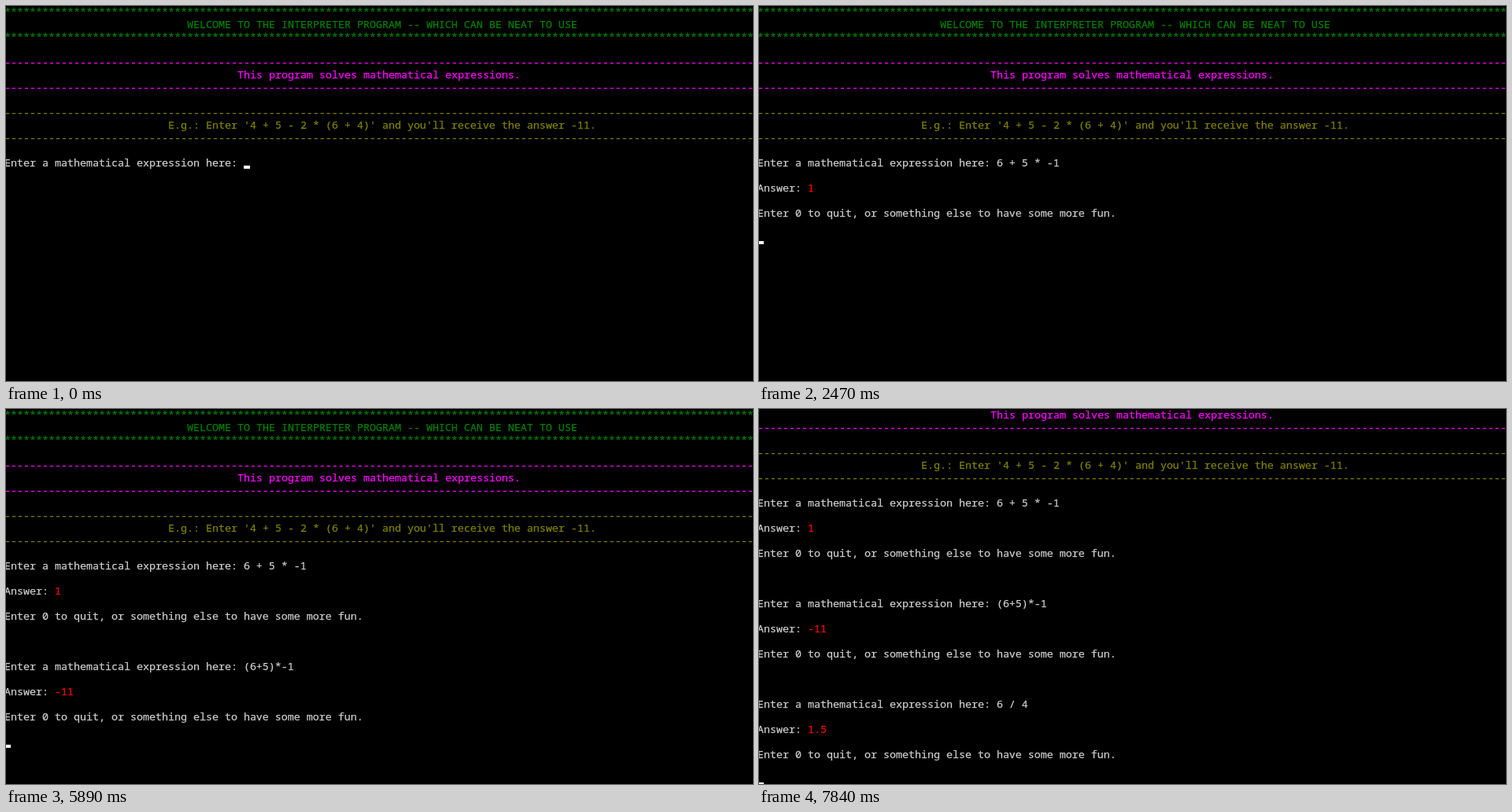
Animation of 949x477 px, one loop 8000 ms. Source, as an HTML page:

```html
<!DOCTYPE html>
<html lang="en">
<head>
<meta charset="utf-8">
<title>Interpreter program</title>
<style>
  html, body { margin: 0; width: 100%; height: 100%; overflow: hidden; background: #000; }
  svg { display: block; width: 949px; height: 477px; overflow: hidden; }
  text {
    font: 13.3333px "Noto Sans Mono", "DejaVu Sans Mono", monospace;
    white-space: pre;
    color: #ccc;
    fill: currentColor;
    stroke: currentColor;
    stroke-width: .25px;
  }
  .green { color: #008000; }
  .magenta { color: #f0f; }
  .olive { color: #808000; }
  .red { color: #f00; }
</style>
</head>
<body>
<svg viewBox="0 0 949 477">
  <g id="screen"><rect id="cursor" width="8" height="4" fill="#fff"/></g>
</svg>
<script>
const LOOP = 8000, CELL = 8, LINE = 16, LEFT = -2, COLS = 120, PACE = 80;
const PROMPT = 'Enter a mathematical expression here: ';
const screen = document.getElementById('screen');
const cursor = document.getElementById('cursor');

// typed: bursts of keys by start time, one key every PACE ms
const rounds = [
  { start: 0, done: 2470, answer: '1',
    typed: { 870: '6 +', 1360: ' ', 1590: '5 ', 1910: '* -1' } },
  { start: 2930, done: 5890, answer: '-11',
    typed: { 2930: '(', 3400: '6+', 3710: '5', 4710: ')', 5090: '*', 5410: '-1' } },
  { start: 6200, done: 7840, answer: '1.5',
    typed: { 6360: '6', 6530: ' /', 6910: ' ', 7060: '4' } }
];
// Spans in which the cursor is blinked off
const blinks = [[230, 790], [1740, 1910], [2700, 2930], [3940, 5180], [7230, 7750]];

function put(row, col, str, cls = '') {
  const el = document.createElementNS('http://www.w3.org/2000/svg', 'text');
  el.setAttribute('x', LEFT + col * CELL);
  el.setAttribute('y', row * LINE + 12);
  el.setAttribute('class', cls);
  el.textContent = str;
  screen.insertBefore(el, cursor);
  return el;
}

function banner(row, str, mark, cls) {
  const col = Math.floor((COLS - str.length) / 2);
  put(row, 0, mark.repeat(COLS), cls);
  put(row + 1, col, str, cls);
  put(row + 2, 0, mark.repeat(COLS), cls);
}

banner(0, 'WELCOME TO THE INTERPRETER PROGRAM -- WHICH CAN BE NEAT TO USE', '*', 'green');
banner(4, 'This program solves mathematical expressions.', '-', 'magenta');
banner(8, "E.g.: Enter '4 + 5 - 2 * (6 + 4)' and you'll receive the answer -11.", '-', 'olive');

rounds.forEach((r, i) => {
  r.row = 12 + 8 * i;
  r.input = put(r.row, 0, '');
  r.output = [
    put(r.row + 2, 0, 'Answer: '),
    put(r.row + 2, 8, r.answer, 'red'),
    put(r.row + 4, 0, 'Enter 0 to quit, or something else to have some more fun.')
  ];
});

const show = (el, on) => el.setAttribute('visibility', on ? 'visible' : 'hidden');

function typedBy(typed, t) {
  return Object.entries(typed)
    .map(([from, keys]) => keys.slice(0, Math.max(0, Math.floor((t - from) / PACE) + 1)))
    .join('');
}

function render(t) {
  let row = 0, col = 0;
  for (const r of rounds) {
    const started = t >= r.start, done = t >= r.done;
    show(r.input, started);
    r.output.forEach(el => show(el, done));
    if (!started) continue;
    const line = PROMPT + typedBy(r.typed, t);
    if (r.input.textContent !== line) r.input.textContent = line;
    row = done ? r.row + 6 : r.row;
    col = done ? 0 : line.length;
  }
  show(cursor, !blinks.some(([from, to]) => t >= from && t < to));
  cursor.setAttribute('x', LEFT + col * CELL);
  cursor.setAttribute('y', row * LINE + 11);
  const scroll = t >= rounds[2].done ? 5 * LINE : 0;
  screen.setAttribute('transform', `translate(0 ${-scroll})`);
}

const begin = performance.now();
function tick() {
  render((performance.now() - begin) % LOOP);
  requestAnimationFrame(tick);
}
tick();
</script>
</body>
</html>
```
